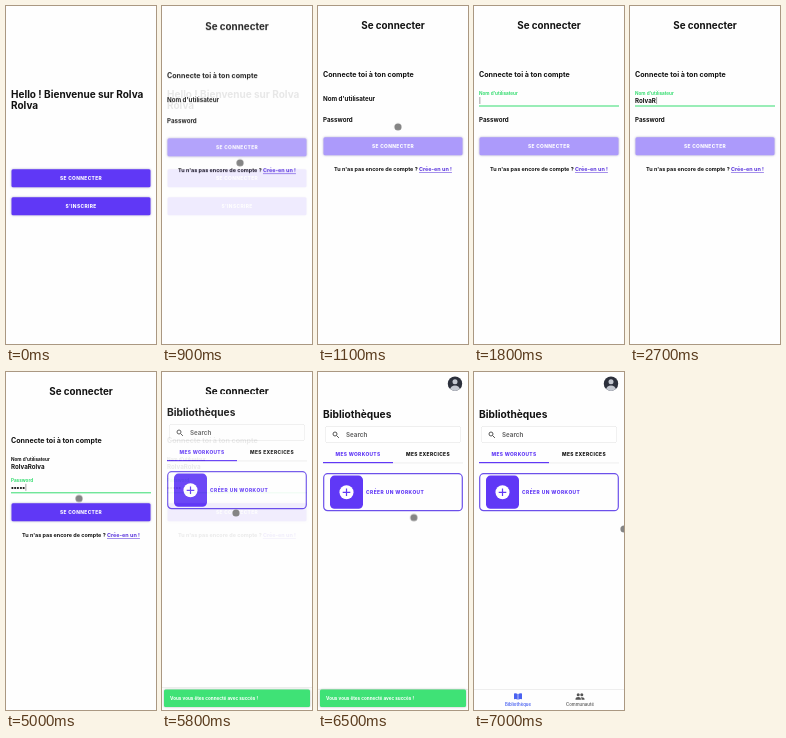
These frames come from a looping animation (150 by 338 pixels, 7100 ms). An HTML page:

```html
<!DOCTYPE html>
<html lang="fr">
<head>
<meta charset="utf-8">
<title>Connexion</title>
<style>
  /* One loop is 7100 ms, so 1% = 71 ms */
  :root { --violet: #6038f6; --green: #35dc70; --ink: #111; }
  html, body { margin: 0; width: 100%; height: 100%; overflow: hidden; background: #fefefe; }
  svg { display: block; width: 100vw; height: 100vh; }
  text { font: 700 6.2px Inter, "Open Sans", sans-serif; fill: var(--ink); white-space: pre; }
  .h1 { font-size: 10px; }
  .caps { font-size: 4.85px; font-weight: 800; letter-spacing: .35px; }
  .mid { text-anchor: middle; }
  .white { fill: #fff; }
  .violet { fill: var(--violet); }
  .page { fill: #fefefe; }
  .btn { fill: var(--violet); filter: drop-shadow(0 .5px .8px #3a2a8066); }

  #login, #library, #toast, #pointer, #avatar, #title, #submit,
  .label, .line { animation: 7100ms linear infinite; }

  #login { animation-name: login; }
  @keyframes login {
    0%, 8.45% { opacity: 0; transform: translateY(12px); animation-timing-function: ease-out; }
    14.08%, 100% { opacity: 1; transform: none; }
  }
  #title { animation-name: title; }
  @keyframes title {
    0%, 83.09% { visibility: visible; }
    83.1%, 100% { visibility: hidden; }
  }

  #userLabel { animation-name: user-label; }
  @keyframes user-label {
    0%, 22.54% { transform: translate(5px, 95.2px); fill: var(--ink); }
    25.35%, 46.48% { transform: translate(5px, 89px) scale(.746); fill: var(--green); }
    47.89%, 100% { transform: translate(5px, 89px) scale(.746); fill: var(--ink); }
  }
  #passLabel { animation-name: pass-label; }
  @keyframes pass-label {
    0%, 46.48% { transform: translate(5px, 116.2px); fill: var(--ink); }
    49.3%, 100% { transform: translate(5px, 109.5px) scale(.746); fill: var(--green); }
  }
  .line { fill: var(--green); transform-box: fill-box; transform-origin: center; }
  #userLine { animation-name: user-line; }
  @keyframes user-line {
    0%, 22.54% { transform: scaleX(0); opacity: 1; }
    25.35%, 46.48% { transform: none; opacity: 1; }
    47.89%, 100% { transform: none; opacity: 0; }
  }
  #passLine { animation-name: pass-line; }
  @keyframes pass-line {
    0%, 46.48% { transform: scaleX(0); }
    49.3%, 100% { transform: none; }
  }
  #submit { animation-name: submit; }
  @keyframes submit {
    0%, 50.65% { fill: #ac9afb; }
    50.7%, 100% { fill: var(--violet); }
  }

  #library { animation-name: library; }
  @keyframes library {
    0%, 77.46% { opacity: 0; transform: translateY(14px); animation-timing-function: ease-out; }
    81.69% { opacity: .92; transform: translateY(-2px); }
    83.1% { opacity: 1; transform: translateY(-2px); }
    84.51%, 100% { opacity: 1; transform: none; }
  }
  #avatar { animation-name: avatar; }
  @keyframes avatar {
    0%, 83.1% { opacity: 0; }
    84.51%, 100% { opacity: 1; }
  }
  #toast { animation-name: toast; }
  @keyframes toast {
    0%, 78.87% { transform: translateY(24px); opacity: 1; animation-timing-function: ease-out; }
    81.69%, 94.37% { transform: none; opacity: 1; }
    97.18%, 100% { transform: none; opacity: 0; }
  }

  #pointer { fill: #858585; animation-name: pointer; }
  @keyframes pointer {
    0%, 7% { transform: translate(77px, 175px); opacity: 0; }
    7.04%, 11.27% { transform: translate(77px, 175px); opacity: 1; }
    15.49% { transform: translate(80px, 121px); opacity: 1; }
    19.72%, 25.3% { transform: translate(66px, 96px); opacity: 1; }
    25.35%, 64.7% { transform: translate(71px, 113px); opacity: 0; }
    64.79% { transform: translate(71px, 113px); opacity: 1; }
    70.42% { transform: translate(73px, 126.5px); opacity: 1; }
    74.65%, 88.73% { transform: translate(74px, 141px); opacity: 1; }
    98.59%, 100% { transform: translate(150px, 157px); opacity: 1; }
  }
</style>
</head>
<body>
<svg viewBox="0 0 150 338">
  <g id="home">
    <text class="h1" x="5" y="91.7">Hello ! Bienvenue sur Rolva</text>
    <text class="h1" x="5" y="103.2">Rolva</text>
    <rect class="btn" x="5.5" y="163.2" width="139" height="18" rx="1.5"/>
    <text class="caps mid white" x="75" y="173.8">SE CONNECTER</text>
    <rect class="btn" x="5.5" y="191.2" width="139" height="18" rx="1.5"/>
    <text class="caps mid white" x="75" y="201.8">S'INSCRIRE</text>
  </g>

  <g id="login">
    <rect class="page" y="-20" width="150" height="378"/>
    <text id="title" class="h1 mid" x="75" y="22.9" style="font-size:9.8px">Se connecter</text>
    <text x="5" y="71.3" style="font-size:7.1px">Connecte toi à ton compte</text>
    <text id="userLabel" class="label">Nom d'utilisateur</text>
    <text id="user" x="5" y="96.8"></text>
    <rect id="userLine" class="line" x="5" y="99.5" width="140" height="1"/>
    <text id="passLabel" class="label">Password</text>
    <text id="pass" x="5" y="118" style="font:8px 'Liberation Sans',sans-serif"></text>
    <rect id="passLine" class="line" x="5" y="120.3" width="140" height="1"/>
    <rect id="caret" width=".6" height="7" fill="#666"/>
    <rect id="submit" class="btn" x="5.5" y="131.2" width="139" height="18" rx="1.5"/>
    <text class="caps mid white" x="75" y="141.8">SE CONNECTER</text>
    <text class="mid" x="75" y="165" style="font-size:5.45px">Tu n'as pas encore de compte ? <tspan fill="#5a35dc" text-decoration="underline">Crée-en un !</tspan></text>
  </g>

  <g id="library">
    <rect class="page" y="24" width="150" height="340"/>
    <text class="h1" x="5" y="46" style="font-size:10.2px">Bibliothèques</text>
    <rect x="7.8" y="54.3" width="134.4" height="16.5" rx="1" fill="#fff" style="filter:drop-shadow(0 .9px .7px #0005)"/>
    <g fill="none" stroke="#555" stroke-width="1">
      <circle cx="17" cy="62" r="2"/>
      <path d="M18.5 63.5l2.4 2.4"/>
    </g>
    <text x="28" y="65" style="fill:#666">Search</text>
    <text class="caps mid violet" x="40" y="84">MES WORKOUTS</text>
    <text class="caps mid" x="110" y="84">MES EXERCICES</text>
    <rect x="5" y="90.7" width="140" height=".5" fill="#ddd"/>
    <rect class="violet" x="5" y="90" width="70" height="1.2"/>
    <rect x="5.7" y="101.7" width="138.6" height="37" rx="4" fill="#fefefe" stroke="#6c50ea" stroke-width="1.2"/>
    <rect class="violet" x="12" y="103.6" width="33" height="33.2" rx="4.5"/>
    <circle cx="28.5" cy="120.3" r="7" fill="#fff"/>
    <path d="M24.7 120.3h7.6M28.5 116.5v7.6" stroke="#6038f6" stroke-width="1.2"/>
    <text class="caps violet" x="48" y="122.2" style="letter-spacing:.45px">CRÉER UN WORKOUT</text>

    <rect y="317" width="150" height=".5" fill="#ddd"/>
    <path d="M40 321.5q2.2-.6 3.7.6v5.6q-1.5-1-3.7-.5zM48 321.5q-2.2-.6-3.7.6v5.6q1.5-1 3.7-.5z" fill="#4a62f0"/>
    <text class="mid" x="44" y="333.5" style="font-size:4.3px;font-weight:600;fill:#4a62f0">Bibliothèque</text>
    <g fill="#555">
      <circle cx="104.2" cy="322.8" r="1.5"/>
      <circle cx="107.8" cy="322.8" r="1.5"/>
      <path d="M101.5 327.7v-1q0-1.6 2.7-1.6t2.7 1.6v1zM107.5 327.7v-1q0-1-.6-1.5 3.6-.4 3.6 1.5v1z"/>
    </g>
    <text class="mid" x="106" y="333.5" style="font-size:4.3px;font-weight:600;fill:#666">Communauté</text>
  </g>

  <g id="avatar">
    <clipPath id="disc"><circle cx="137" cy="11.7" r="7.2"/></clipPath>
    <circle cx="137" cy="11.7" r="7.2" fill="#2c303c"/>
    <g clip-path="url(#disc)" fill="#c3c7d0">
      <circle cx="137" cy="9.8" r="2.5"/>
      <ellipse cx="137" cy="18" rx="5" ry="4.6"/>
    </g>
  </g>

  <g id="toast">
    <rect x="2" y="317.5" width="146" height="17.5" rx="1.5" fill="#3fe276" style="filter:drop-shadow(0 .6px 1.2px #0004)"/>
    <text class="white" x="8" y="328" style="font-size:4.6px">Vous vous êtes connecté avec succès !</text>
  </g>

  <circle id="pointer" r="3.6"/>
</svg>
<script>
  const LOOP = 7100, NAME = "RolvaRolva";
  const [user, pass, caret] = ["user", "pass", "caret"].map(id => document.getElementById(id));
  const start = performance.now();

  const typed = (t, from, gap, max) =>
    t < from ? 0 : Math.min(max, Math.floor((t - from) / gap) + 1);

  function draw() {
    const t = (performance.now() - start) % LOOP;
    user.textContent = NAME.slice(0, typed(t, 2000, 140, NAME.length));
    pass.textContent = "•".repeat(typed(t, 3600, 150, 5));

    const onPass = t >= 3400;
    const field = onPass ? pass : user;
    const blinkOff = t >= 4400 && t < 4900;
    caret.setAttribute("x", 5.6 + field.getComputedTextLength());
    caret.setAttribute("y", onPass ? 111.8 : 91);
    caret.style.visibility = t < 1800 || t >= 5400 || blinkOff ? "hidden" : "visible";
    requestAnimationFrame(draw);
  }
  draw();
</script>
</body>
</html>
```
